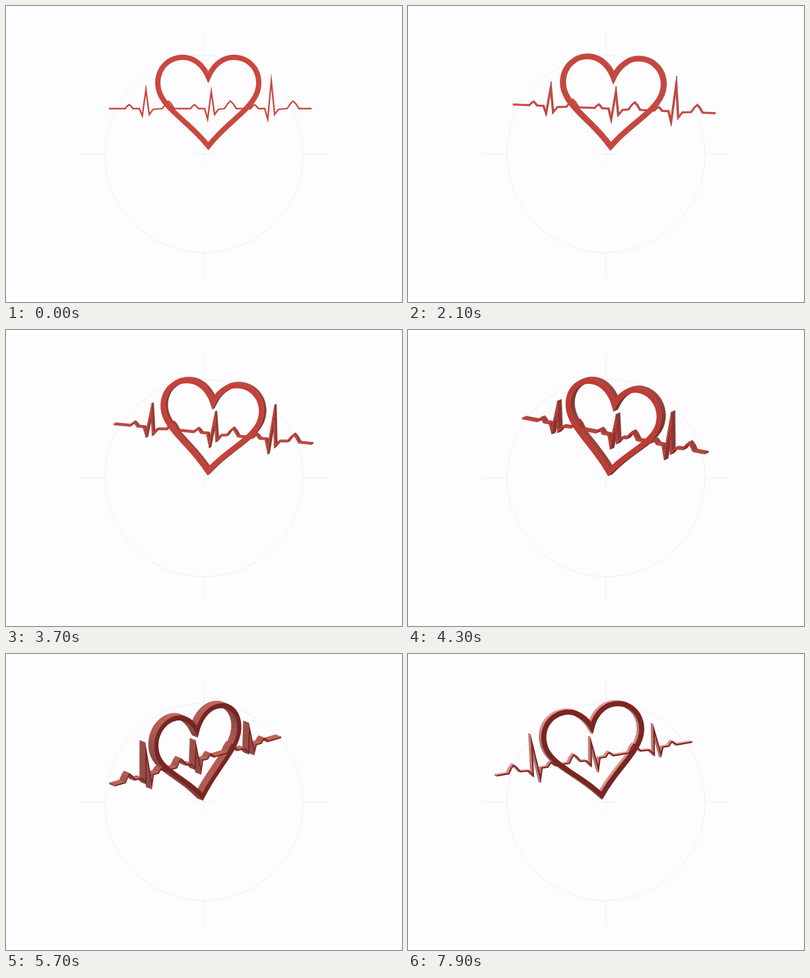
These frames come from a looping animation (600 px wide and 450 px high, 8000 ms). An HTML page with a canvas:

```html
<!DOCTYPE html>
<html lang="en">
<head>
<meta charset="utf-8">
<title>Heartbeat pendant</title>
<style>
  html, body { margin: 0; width: 100%; height: 100%; overflow: hidden; background: #fdfcfe; }
  canvas { display: block; width: 600px; height: 450px; }
</style>
</head>
<body>
<canvas id="stage"></canvas>
<script>
const LOOP = 8000, STEP = 100, CX = 300, CY = 225, HALF_DEPTH = 7.5;
const canvas = document.getElementById('stage');
const ratio = window.devicePixelRatio || 1;
canvas.width = 600 * ratio;
canvas.height = 450 * ratio;
const ctx = canvas.getContext('2d');

const clamp01 = u => Math.max(0, Math.min(1, u));
const mix = (a, b, u) => a.map((v, i) => v + (b[i] - v) * u);
const rgb = (tint, k = 1) => `rgb(${tint.map(v => Math.round(Math.min(255, v * k))).join()})`;

const FRONT = [201, 72, 63], FRONT_TURNED = [172, 42, 38], BACK = [120, 38, 35];
const WALL_DARK = [150, 62, 54], WALL_LIGHT = [212, 136, 126];
const BASELINE = 156;

// One heartbeat: small bump, spike between two dips, rounded bump
function beat(x, rise, dip, tail) {
  const bump = (at, half, height) =>
    [[-1, 0], [-0.45, 0.65], [0, 1], [0.45, 0.65], [1, 0]].map(([u, v]) => [at + half * u, -height * v]);
  const local = [
    ...bump(-25.5, 6, 6), [-10, 0],
    [-5.5, dip], [0, -rise], [5, 9], [11, 1],
    ...bump(tail, 9, 11.5)
  ];
  return local.map(([dx, dy]) => [x + dx, BASELINE + dy]);
}

const pulsePoints = [
  [156, BASELINE],
  ...beat(212, 29, 11, 34),
  ...beat(311, 26, 16, 29),
  ...beat(402, 42, 16, 33),
  [463, BASELINE]
];

// left half of the heart as Bezier pieces, mirrored for the right half
const heartCurves = [
  [[306.5, 108], [300, 92], [286, 78], [268, 78]],
  [[268, 78], [246, 78], [230, 95], [230, 117]],
  [[230, 117], [230, 152], [272, 170], [306.5, 213]]
];

function bezier([a, b, c, d], u) {
  const v = 1 - u;
  return [0, 1].map(i => v * v * v * a[i] + 3 * v * v * u * b[i] + 3 * v * u * u * c[i] + u * u * u * d[i]);
}

function heartPoints() {
  const left = [], n = 14;
  for (const curve of heartCurves)
    for (let i = 0; i < n; i++) left.push(bezier(curve, i / n));
  const right = left.slice(1).reverse().map(([x, y]) => [613 - x, y]);
  return [...left, [306.5, 213], ...right];
}

// Turns a centre line into outlines whose outward normal is (dy, -dx)
function outline(points, width, closed) {
  const n = points.length, a = [], b = [];
  const normal = (p, q) => {
    const dx = q[0] - p[0], dy = q[1] - p[1], len = Math.hypot(dx, dy);
    return [dy / len, -dx / len];
  };
  points.forEach((p, i) => {
    const prev = points[i - 1] || (closed && points[n - 1]);
    const next = points[i + 1] || (closed && points[0]);
    const n1 = normal(prev || p, prev ? p : next);
    const n2 = normal(next ? p : prev, next || p);
    const scale = width / 2 / Math.max(0.012, 1 + n1[0] * n2[0] + n1[1] * n2[1]);
    const ox = (n1[0] + n2[0]) * scale, oy = (n1[1] + n2[1]) * scale;
    a.push([p[0] + ox - CX, p[1] + oy - CY]);
    b.push([p[0] - ox - CX, p[1] - oy - CY]);
  });
  b.reverse();
  return closed ? [a, b] : [[...a, ...b]];
}

const shapes = [outline(heartPoints(), 8, true), outline(pulsePoints, 2.3, false)];

// The viewer travels in a straight line from the front, just above the pendant, to the back
function viewAngles(t) {
  const x = 0.077 * t, y = 0.046 * t, z = 5.03 - t;
  const yaw = Math.atan2(x, z);
  const pitch = Math.atan2(y, Math.hypot(x, z));
  const roll = (1.1 * t * Math.cos(yaw) + Math.sin(yaw)) * Math.PI / 180;
  return { yaw, pitch, roll };
}

function rotator({ yaw, pitch, roll }) {
  const cy = Math.cos(yaw), sy = Math.sin(yaw);
  const cp = Math.cos(pitch), sp = Math.sin(pitch);
  const cr = Math.cos(roll), sr = Math.sin(roll);
  return (x, y, z) => {
    const x1 = x * cy - z * sy, z1 = x * sy + z * cy;
    const y1 = y * cp + z1 * sp, z2 = z1 * cp - y * sp;
    return [x1 * cr - y1 * sr, x1 * sr + y1 * cr, z2];
  };
}

function trace(points) {
  points.forEach(([x, y], i) => i ? ctx.lineTo(x, y) : ctx.moveTo(x, y));
  ctx.closePath();
}

function drawGuides() {
  ctx.strokeStyle = '#f0eff5';
  ctx.lineWidth = 1;
  ctx.beginPath();
  ctx.arc(CX, CY, 150, 0, 2 * Math.PI);
  for (const [from, to] of [[-187, -150], [-15, 15], [150, 187]]) {
    ctx.moveTo(CX + from, CY);
    ctx.lineTo(CX + to, CY);
    ctx.moveTo(CX, CY + from);
    ctx.lineTo(CX, CY + to);
  }
  ctx.stroke();
}

function drawPendant(t) {
  const view = viewAngles(t), rotate = rotator(view);
  const facing = rotate(0, 0, 1)[2] >= 0 ? 1 : -1;
  const cap = facing > 0 ? mix(FRONT, FRONT_TURNED, Math.sin(view.yaw)) : BACK;
  const wall = mix(WALL_DARK, WALL_LIGHT, clamp01((t - 5) / 2));
  const quads = [];
  for (const loop of shapes.flat()) loop.forEach((p, i) => {
    const q = loop[(i + 1) % loop.length];
    const dx = q[0] - p[0], dy = q[1] - p[1], len = Math.hypot(dx, dy) || 1;
    const [, ny, nz] = rotate(dy / len, -dx / len, 0);
    if (nz <= 0) return;
    const corners = [[p, 1], [q, 1], [q, -1], [p, -1]].map(([v, side]) => rotate(...v, side * HALF_DEPTH));
    const depth = corners.reduce((sum, c) => sum + c[2], 0);
    quads.push({ corners, depth, color: rgb(wall, 0.92 - 0.22 * ny) });
  });
  quads.sort((a, b) => a.depth - b.depth);

  ctx.save();
  ctx.translate(CX, CY);
  ctx.lineWidth = 0.5;
  ctx.lineJoin = 'round';
  for (const { corners, color } of quads) {
    ctx.fillStyle = ctx.strokeStyle = color;
    ctx.beginPath();
    trace(corners);
    ctx.fill();
    ctx.stroke();
  }
  ctx.fillStyle = rgb(cap);
  for (const loops of shapes) {
    ctx.beginPath();
    for (const loop of loops) trace(loop.map(([x, y]) => rotate(x, y, facing * HALF_DEPTH)));
    ctx.fill();
  }
  ctx.restore();
}

function render(ms) {
  ctx.setTransform(ratio, 0, 0, ratio, 0, 0);
  ctx.fillStyle = '#fdfcfe';
  ctx.fillRect(0, 0, 600, 450);
  drawGuides();
  drawPendant(Math.floor(ms / STEP) * STEP / 1000);
}

const start = performance.now();
function tick() {
  render((performance.now() - start) % LOOP);
  requestAnimationFrame(tick);
}
tick();
</script>
</body>
</html>
```
